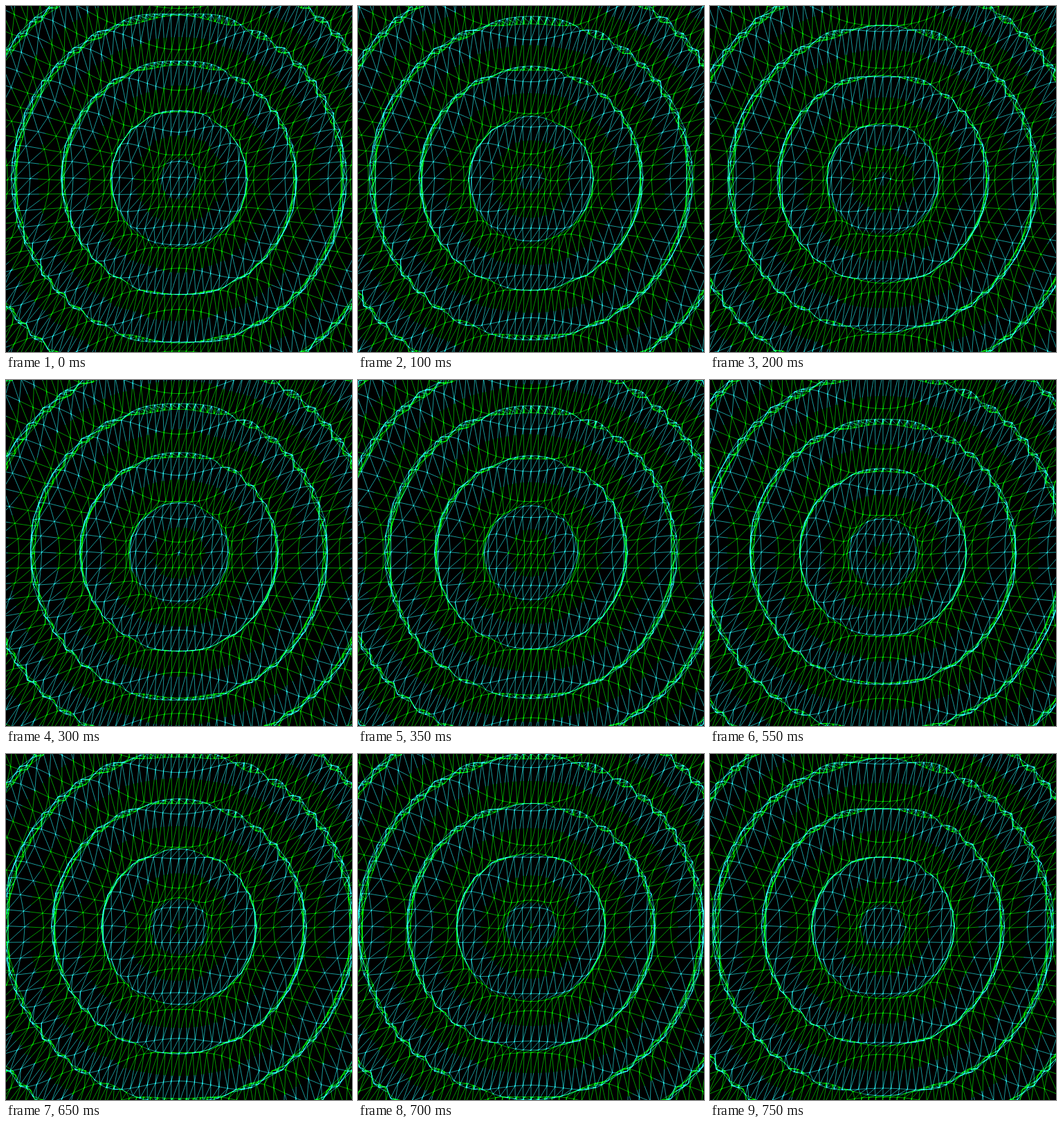
These frames come from a looping animation (500 px wide and 500 px high, 0.8 s). An HTML page with a canvas:

```html
<!DOCTYPE html>
<html lang="en">
<head>
<meta charset="utf-8">
<title>Ripple mesh</title>
<style>
html, body { margin: 0; width: 100%; height: 100%; overflow: hidden; background: #000; }
canvas { display: block; }
</style>
</head>
<body>
<canvas id="stage" width="500" height="500"></canvas>
<script>
const ctx = document.getElementById("stage").getContext("2d");
const SIZE = 500, CENTER = SIZE / 2;
const LOOP = 800, STEP = 50;
const CELL_W = 10.95, CELL_H = 21.9;
const HALF_COLS = 28, HALF_ROWS = 14;
const WAVELENGTH = 69.8, FIRST_EDGE = 98.8;
const DEPTH = 0.17, FADE = 0.0033, VANISH_Y = 18;
const GREEN = "rgb(0,215,0)", CYAN = "rgb(30,215,215)";
// Neighbour offsets: along rows, along columns, rising diagonals.
const DIRECTIONS = [[1, 0], [0, 1], [1, -1]];

// A fading circular wave seen from above; heights push points away from a
// vanishing point slightly below the centre.
function project(col, row, edge) {
  const x = col * CELL_W, y = row * CELL_H;
  const radius = Math.hypot(x, y);
  const height = Math.sin((edge - radius) * 2 * Math.PI / WAVELENGTH);
  const push = DEPTH * Math.exp(-FADE * radius) * height;
  return { x: CENTER + x + x * push, y: CENTER + y + (y - VANISH_Y) * push, height };
}

function buildMesh(edge) {
  const mesh = [];
  for (let row = -HALF_ROWS; row <= HALF_ROWS; row++) {
    const line = [];
    for (let col = -HALF_COLS; col <= HALF_COLS; col++) line.push(project(col, row, edge));
    mesh.push(line);
  }
  return mesh;
}

function addLine(path, a, b) {
  path.moveTo(a.x, a.y);
  path.lineTo(b.x, b.y);
}

// Crests are cyan and troughs green; an edge changes colour at height zero.
function addEdge(high, low, a, b) {
  const pathOf = point => point.height > 0 ? high : low;
  if (pathOf(a) === pathOf(b)) {
    addLine(pathOf(a), a, b);
    return;
  }
  const f = a.height / (a.height - b.height);
  const mid = { x: a.x + (b.x - a.x) * f, y: a.y + (b.y - a.y) * f };
  addLine(pathOf(a), a, mid);
  addLine(pathOf(b), mid, b);
}

function strokePath(path, color) {
  ctx.strokeStyle = color;
  ctx.stroke(path);
}

function draw(time) {
  const mesh = buildMesh(FIRST_EDGE - WAVELENGTH * time / LOOP);
  ctx.globalCompositeOperation = "source-over";
  ctx.fillStyle = "#000";
  ctx.fillRect(0, 0, SIZE, SIZE);
  ctx.globalCompositeOperation = "lighter";
  ctx.lineWidth = 0.7;
  for (const [dx, dy] of DIRECTIONS) {
    const high = new Path2D(), low = new Path2D();
    mesh.forEach((line, row) => line.forEach((point, col) => {
      const next = mesh[row + dy]?.[col + dx];
      if (next) addEdge(high, low, point, next);
    }));
    strokePath(low, GREEN);
    strokePath(high, CYAN);
  }
}

const start = performance.now();
let shown = -1;
function tick() {
  const elapsed = (performance.now() - start) % LOOP;
  const time = Math.floor(elapsed / STEP) * STEP;
  if (time !== shown) draw(shown = time);
  requestAnimationFrame(tick);
}
tick();
</script>
</body>
</html>
```
